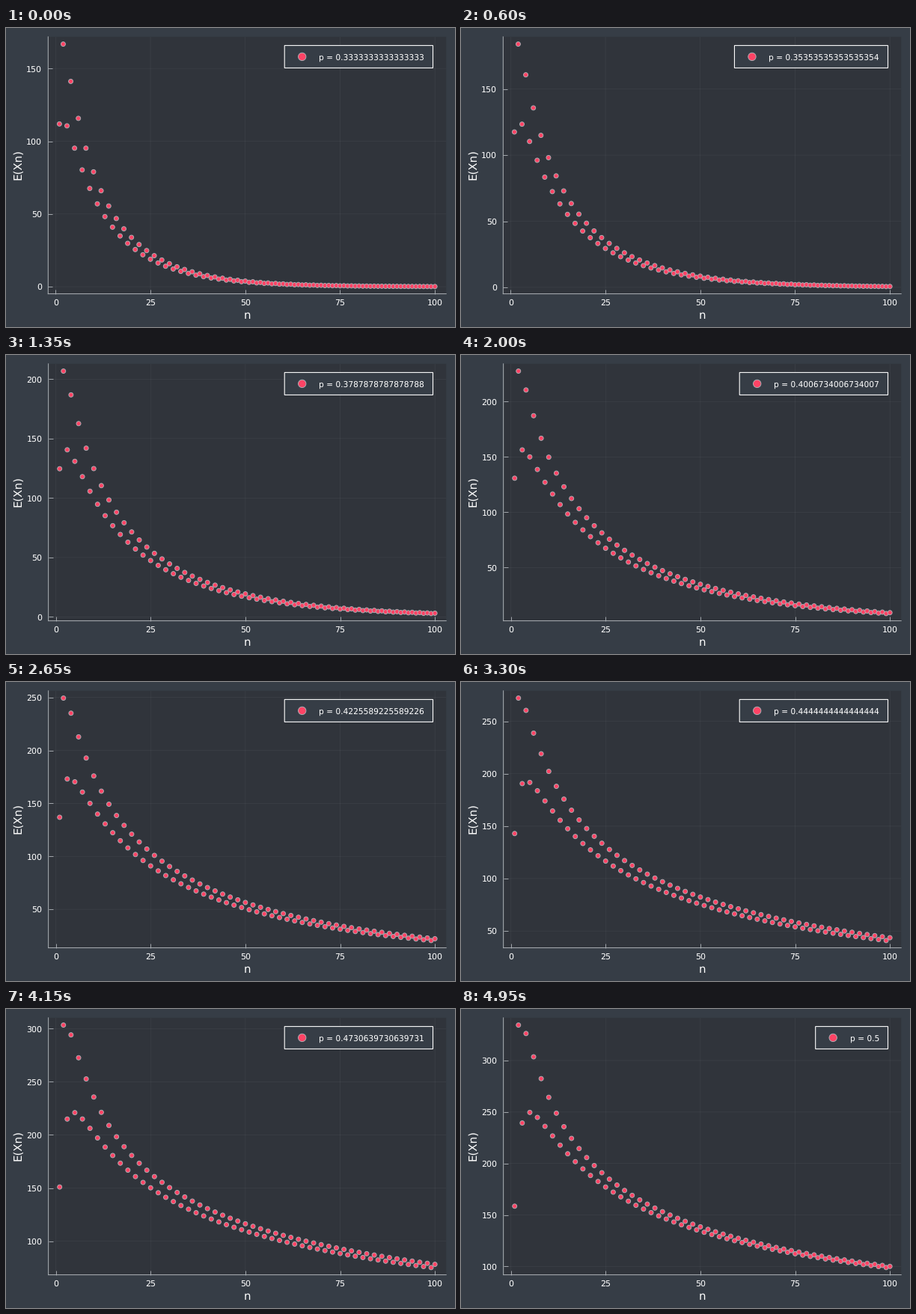
A matplotlib script that plays this animation: 600 px wide and 400 px high, repeating every 5000 ms.

```python
import numpy as np
import matplotlib.pyplot as plt
from matplotlib.animation import FuncAnimation
from matplotlib.patches import Circle, Rectangle
from matplotlib.ticker import MultipleLocator

W, H, DPI = 600, 400, 100
FRAMES, INTERVAL = 100, 50
PT = 72 / DPI  # points per pixel

OUTER, INNER = "#363D46", "#30343B"
FG, TEXT, DOT = "#ADB2B7", "#FFFFFF", "#FE4365"
TOP, BOTTOM, RIGHT = 11.8, 355.6, 588.2
KEY_RIGHT, KEY_TOP, KEY_HEIGHT = 570.5, 23.4, 30
KEY_MID = H - KEY_TOP - KEY_HEIGHT / 2

STEPS = np.arange(1, 101)
# Starting crowd on sites -4..4: three bulk sites, then a geometric tail
START = np.array([18.2, 962.4, 1184.0] + [74.6 * 4.0 ** -k for k in range(-1, 5)])

plt.rcParams.update({"font.family": "DejaVu Sans", "text.hinting": "none",
                     "path.snap": False})


def expected(p):
    """Expected count at site 0 after each step of a walk going up with chance p."""
    crowd, counts = START, []
    for n in STEPS:
        crowd = np.convolve(crowd, [1 - p, 0, p])
        counts.append(crowd[4 + n])
    return np.array(counts)


def padded(lo, hi):
    margin = 0.03 * (hi - lo)
    return lo - margin, hi + margin


fig = plt.figure(figsize=(W / DPI, H / DPI), dpi=DPI, facecolor=OUTER)
ax = fig.add_axes([0.1, 0.1, 0.8, 0.8], facecolor=INNER)
ax.set_xlim(*padded(STEPS[0], STEPS[-1]))
ax.xaxis.set_major_locator(MultipleLocator(25))
ax.yaxis.set_major_locator(MultipleLocator(50))
ax.tick_params(direction="in", length=6 * PT, width=0.9 * PT, color=FG,
               labelcolor=TEXT, labelsize=11 * PT)
ax.tick_params(axis="x", pad=6.8 * PT)
ax.tick_params(axis="y", pad=8.2 * PT)
ax.grid(color=FG, alpha=0.1, lw=0.7 * PT)
ax.set_axisbelow(True)
for side, spine in ax.spines.items():
    spine.set_visible(side in ("left", "bottom"))
    spine.set(color=FG, linewidth=PT)

fig.text(322.6 / W, 1 - 388.6 / H, "n", color=TEXT, size=15 * PT,
         ha="center", va="baseline")
fig.text(16 / W, 1 - 182.8 / H, "E(Xn)", color=TEXT, size=15 * PT, rotation=90,
         ha="center", va="center")

# One size per dot keeps the dots off the whole-pixel grid
points = ax.scatter(STEPS, STEPS, s=np.full(len(STEPS), (6 * PT) ** 2), c=DOT,
                    edgecolors=FG, linewidths=0.9 * PT, zorder=3)

# Legend, laid out in pixels from the lower left corner
box = Rectangle((0, H - KEY_TOP - KEY_HEIGHT), 1, KEY_HEIGHT, transform=None,
                fc=OUTER, ec=TEXT, lw=1.1 * PT, zorder=5)
key = Circle((0, KEY_MID), 5.2, transform=None, fc=DOT, ec=FG, lw=0.9 * PT, zorder=6)
for part in (box, key):
    ax.add_artist(part)
label = ax.text(559, KEY_MID - 4, "", transform=None, color=TEXT, size=10.6 * PT,
                ha="right", va="baseline", zorder=6)


def update(i):
    p = (198 + i) / 594  # from 1/3 to 1/2
    counts = expected(p)
    low, high = padded(counts.min(), counts.max())

    # Wider tick labels push the left axis in slightly
    left = 56.3 + 0.35 * ((high >= 200) + (high >= 300))
    ax.set_position([left / W, 1 - BOTTOM / H, (RIGHT - left) / W, (BOTTOM - TOP) / H])
    ax.set_ylim(low, high)
    points.set_offsets(np.column_stack([STEPS, counts]))

    label.set_text(f"p = {p}")
    x = label.get_window_extent().x0
    box.set_x(x - 46)
    box.set_width(KEY_RIGHT - x + 46)
    key.center = x - 22.5, KEY_MID
    return points, box, key, label


anim = FuncAnimation(fig, update, frames=FRAMES, interval=INTERVAL, repeat=True,
                     repeat_delay=0, blit=False)
plt.show()
```
